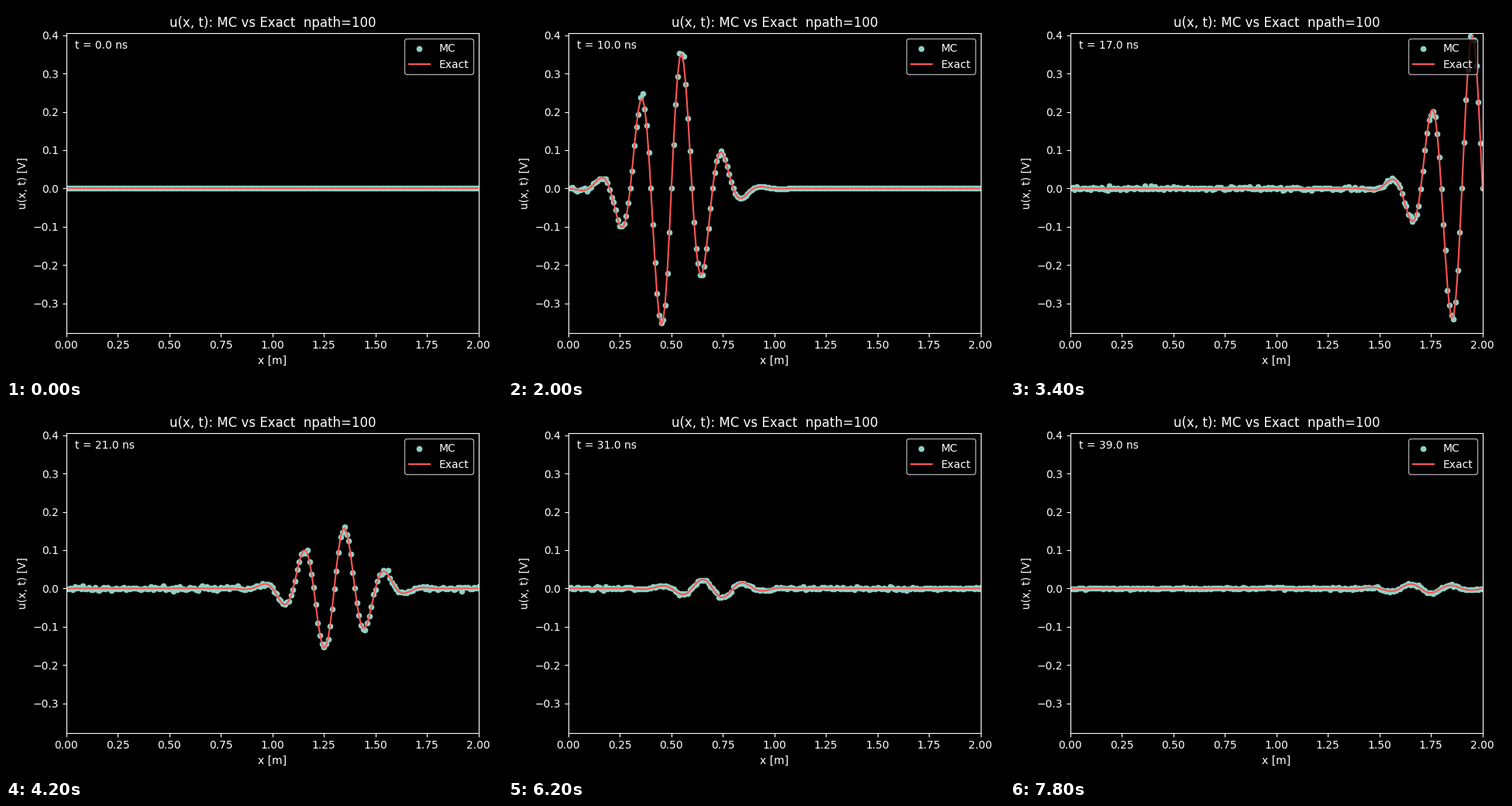
Recreate the animation shown at these times as a matplotlib script. Size 640 by 480 pixels, loop 8 s.

```python
import numpy as np
import matplotlib.pyplot as plt
from matplotlib.animation import FuncAnimation

FRAMES = 40
SPEED = 0.2        # m/ns
LENGTH = 2.0       # m
LOSS = 0.138       # 1/m
R_SOURCE, R_LOAD = 0.2, -0.6
T0, WIDTH = 7.5, 0.75   # ns

x = np.linspace(0, LENGTH, 201)


def pulse(t):
    """Gaussian burst with a 1 GHz carrier, launched at x = 0."""
    return 0.4 * np.exp(-((t - T0) / WIDTH) ** 2 / 2) * np.sin(2 * np.pi * t)


def travelled(t, dist):
    return np.exp(-LOSS * dist) * pulse(t - dist / SPEED)


def exact(t):
    u = np.zeros_like(x)
    for k in range(3):
        gain = (R_SOURCE * R_LOAD) ** k
        trip = 2 * LENGTH * k
        u += gain * travelled(t, trip + x)
        u += gain * R_LOAD * travelled(t, trip + 2 * LENGTH - x)
    return u


def monte_carlo(t, u):
    """Exact values plus sampling noise that sets in behind the first front."""
    rng = np.random.default_rng(100 + int(t))
    behind = np.clip((SPEED * (t - T0) - x) / 0.2 + 0.5, 0, 1)
    fade = 1 / (1 + np.exp((t - 31) / 4))
    sigma = (0.001 + 0.0018 * fade) * behind + 0.02 * np.abs(u)
    return u + sigma * rng.standard_normal(x.size)


plt.style.use("dark_background")
plt.rcParams["font.family"] = "DejaVu Sans"
fig, ax = plt.subplots(figsize=(6.4, 4.8), dpi=100)
dots = ax.scatter(x, np.zeros_like(x), s=20, color="#8dd3c7", label="MC")
line, = ax.plot(x, np.zeros_like(x), color="#ff5555", lw=1.5, label="Exact")
clock = ax.text(0.02, 0.95, "t = 0.0 ns", transform=ax.transAxes)
ax.set_xlim(0, LENGTH)
ax.set_ylim(-0.377, 0.405)
ax.set_xlabel("x [m]")
ax.set_ylabel("u(x, t) [V]")
ax.set_title("u(x, t): MC vs Exact  npath=100")
ax.legend(loc="upper right")
fig.tight_layout()
fig.subplots_adjust(top=1 - 35.2 / 480)


def update(i):
    t = float(i)
    u = exact(t)
    line.set_ydata(u)
    dots.set_offsets(np.column_stack([x, monte_carlo(t, u)]))
    clock.set_text(f"t = {t:.1f} ns")
    return dots, line, clock


anim = FuncAnimation(fig, update, frames=FRAMES, interval=200,
                     repeat=True, repeat_delay=0)
plt.show()
```
